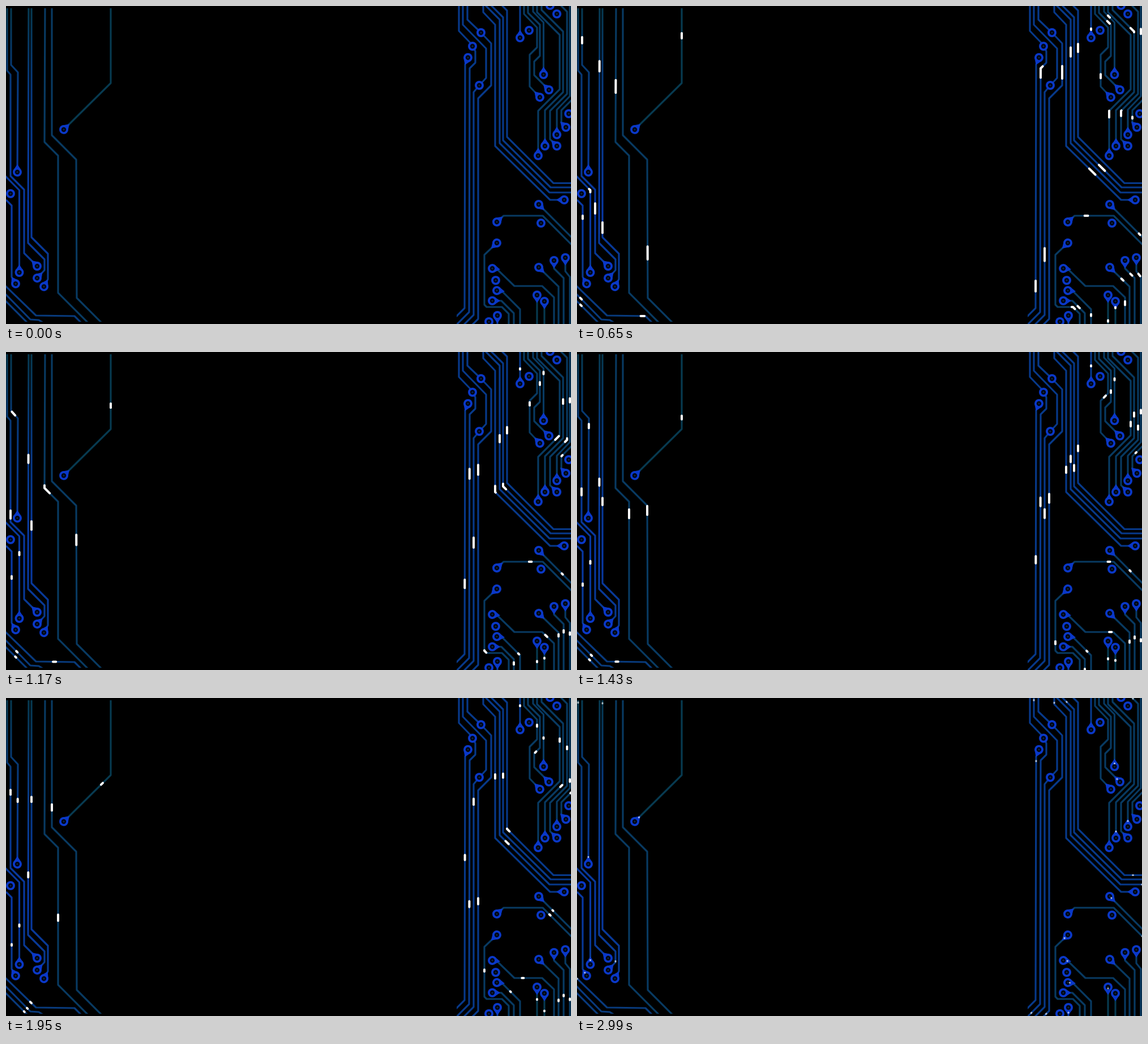
Recreate the animation shown at these times as an HTML page. Size 998 by 561 pixels, loop 3120 ms.

```html
<!DOCTYPE html>
<html lang="en">
<head>
<meta charset="utf-8">
<title>Circuit pulses</title>
<style>
html, body { margin: 0; width: 100%; height: 100%; overflow: hidden; background: #000; }
svg { display: block; width: 998px; height: 561px; }
path { fill: none; }
#traces { stroke: #07398a; stroke-width: 3.2; stroke-linejoin: round; }
#traces .left { stroke: url(#fade); }
#traces .dim { stroke: #083a62; }
#traces .teal { stroke: #073a50; }
#traces .from { marker-start: url(#pad); }
#traces .to { marker-end: url(#pad); }
#pulses { stroke: #fff; stroke-width: 4; stroke-linecap: round; stroke-linejoin: round; }
</style>
</head>
<body>
<svg viewBox="0 0 998 561">
  <defs>
    <clipPath id="board"><path d="M0 4H200V557H0ZM796 0H998V561H796Z"/></clipPath>
    <linearGradient id="fade" gradientUnits="userSpaceOnUse" x1="0" y1="0" x2="0" y2="561">
      <stop offset="0" stop-color="#06394e"/>
      <stop offset=".25" stop-color="#07397c"/>
      <stop offset=".65" stop-color="#0838a6"/>
      <stop offset="1" stop-color="#083a78"/>
    </linearGradient>
    <g id="ring" stroke="none">
      <circle r="8" fill="#0a38c8"/>
      <circle r="4.2" fill="#020612"/>
      <circle r="1.6" fill="#0c2146"/>
    </g>
    <marker id="pad" markerUnits="userSpaceOnUse" markerWidth="30" markerHeight="30" orient="auto-start-reverse" overflow="visible">
      <path d="M-14 0L-4 -6.5V6.5Z" style="fill:#0a38c8;stroke:none"/>
      <use href="#ring"/>
    </marker>
  </defs>

  <g clip-path="url(#board)">
    <g id="traces">
      <!-- left edge -->
      <path class="left to" d="M9 -9V104L21 117L20 293"/>
      <path class="left from" d="M55 459L32 436V324L8 300V121L2 114V-12"/>
      <path class="left to" d="M-6 295L23.5 325V470"/>
      <path class="left to" d="M0 342L10 352V478L17 490"/>
      <path class="left to" d="M40 -8L39 418L68 447V466L55 480"/>
      <path class="left from" d="M67 495L74 482V437L45 408V-12"/>
      <path class="dim" d="M69 0L68 240L92 264V506L171 585"/>
      <path class="dim" d="M171 561L125 515L124 271L81 228V-41"/>
      <path class="teal to" d="M185 -6V136L102 218"/>
      <path class="left" d="M147 573L121 547L53 546L-5 490"/>
      <path class="left" d="M-10 499L43 553L58 554L72 563"/>
      <path class="left" d="M-7 514L55 576"/>

      <!-- long runs on the right -->
      <path class="to" d="M754 589L810 533L811 103L816 91"/>
      <path d="M800 -7V44L824 69L829 80V100L819 110L818 540L785 573"/>
      <path d="M801 570L826 545V152L836 140L848 127V75L807 33V-22"/>
      <path d="M815 -5V24L839 47L857 66V140L834 163V552L811 575"/>
      <path class="from" d="M986 342H961L864 247V33L843 11V-9"/>
      <path d="M842 -6L872 24V242L960 329H1016"/>
      <path d="M1007 320H962L878 237V20L853 -5"/>
      <path d="M869 -8L885 8V231L967 312.500H998"/>

      <!-- top right -->
      <path class="from" d="M908 56V-11"/>
      <path class="dim from" d="M943 161L925 142V86L938 73V38L915 14V-14"/>
      <path class="dim to" d="M922 -4V12L943 33V88L933 98V122L959 148"/>
      <path class="dim to" d="M931 -9V10L949.500 29V121"/>
      <path class="dim from" d="M940 264V185L978 147V51L938 11V-28"/>
      <path class="dim to" d="M946 -7V7L984 45V152L952 184V247"/>
      <path class="dim from" d="M973 247L961 235V185L991 155V10L974 -7"/>
      <path class="dim to" d="M996 -11V159L973 183V227"/>
      <path class="dim from" d="M989 214L981 206V184L1021 144"/>

      <!-- bottom right -->
      <path class="dim from" d="M867 381L879 370H948L1003 425"/>
      <path class="dim to" d="M1009 418L941 350"/>
      <path class="dim to" d="M888 572V543L876 531H849L845 527V439L867 418"/>
      <path class="dim to" d="M968 565V514L947 494H898L867 464L859 463"/>
      <path class="dim to" d="M908 564V535L876 503L867 502"/>
      <path class="dim from" d="M859 520H875L897 542V635"/>
      <path class="to" d="M868 766V546"/>
      <path class="teal to" d="M938 569V510"/>
      <path class="teal from" d="M951 521V570"/>
      <path class="dim from" d="M941 461L976 495V584"/>
      <path class="dim from" d="M968 449V463L985 480V573"/>
      <path class="dim from" d="M988 444V468L996 478V584"/>

      <use href="#ring" x="8" y="331"/>
      <use href="#ring" x="824" y="71"/>
      <use href="#ring" x="839" y="47"/>
      <use href="#ring" x="836" y="140"/>
      <use href="#ring" x="924" y="43"/>
      <use href="#ring" x="961" y="-1"/>
      <use href="#ring" x="973" y="14"/>
      <use href="#ring" x="994" y="190"/>
      <use href="#ring" x="945" y="383"/>
      <use href="#ring" x="865" y="484"/>
      <use href="#ring" x="853" y="557"/>
    </g>
    <g id="pulses"></g>
  </g>
</svg>
<script>
const STEP = 130, STEPS = 24, UNITS = 1000, LENGTH = 45;
const pulses = document.getElementById('pulses');

for (const trace of document.querySelectorAll('#traces path')) {
  const pulse = trace.cloneNode();
  pulse.removeAttribute('class');
  pulse.setAttribute('pathLength', UNITS);
  pulses.append(pulse);
}

// Every pulse runs the whole of its trace and shrinks to a dot on the way.
function draw() {
  const step = Math.floor(performance.now() / STEP) % STEPS;
  const progress = step / STEPS;
  const last = step === STEPS - 1;
  pulses.style.visibility = step ? 'visible' : 'hidden';
  pulses.style.opacity = last ? 0.65 : 1;
  pulses.style.strokeWidth = last ? 3 : 4;
  pulses.style.strokeDasharray = `${LENGTH * (1 - progress)} ${2 * UNITS}`;
  pulses.style.strokeDashoffset = -UNITS * progress;
  requestAnimationFrame(draw);
}
draw();
</script>
</body>
</html>
```
